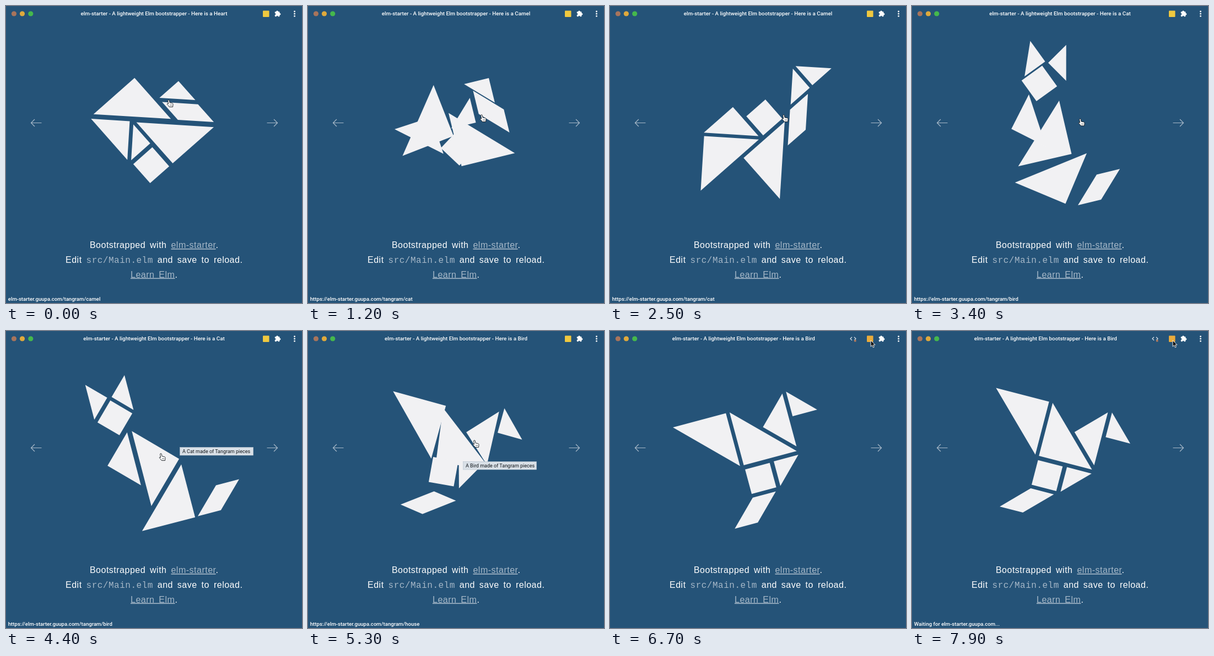
These frames come from a looping animation (537 px wide and 540 px high, 8 s). An HTML page with a canvas:

```html
<!DOCTYPE html>
<html lang="en">
<head>
<meta charset="utf-8">
<title>elm-starter</title>
<style>
html, body { margin: 0; width: 100%; height: 100%; overflow: hidden; background: #255378; }
canvas, svg { position: absolute; left: 0; top: 0; width: 537px; height: 540px; }
.ui { font-family: Roboto, Inter, sans-serif; font-weight: 500; fill: #fff; }
.page { font: 16px "Liberation Sans", Arial, sans-serif; letter-spacing: .5px; word-spacing: 3px; fill: #fff; text-anchor: middle; }
.dim { fill: #a6b8c8; }
.link { fill: #a6b8c8; text-decoration: underline; }
.code { font-family: "Liberation Mono", "Courier New", monospace; }
.arrow { fill: none; stroke: #a9bac9; stroke-width: 1.2; }
</style>
</head>
<body>
<canvas id="stage" width="537" height="540"></canvas>
<svg viewBox="0 0 537 540">
  <circle cx="14.5" cy="14" r="4.6" fill="#a8745c"/>
  <circle cx="29.5" cy="14" r="4.6" fill="#dfa93c"/>
  <circle cx="44.8" cy="14" r="4.6" fill="#45b84c"/>
  <text id="title" class="ui" y="17.3" font-size="9.8" text-anchor="middle"></text>

  <g id="blocked">
    <path d="M439 11l-3 3 3 3M443 11l3 3-3 3" fill="none" stroke="#dfe6ec" stroke-width="1.2"/>
    <rect x="443" y="16" width="3.5" height="3.5" fill="#b07a5e"/>
  </g>
  <rect id="ext" x="466" y="8.5" width="11.5" height="11.5" rx="1"/>
  <g fill="#fff">
    <rect x="487.8" y="10.3" width="8.6" height="9" rx="1"/>
    <circle cx="492" cy="10.3" r="1.8"/>
    <circle cx="496.6" cy="14.7" r="1.8"/>
    <circle cx="523.5" cy="10" r="1.4"/>
    <circle cx="523.5" cy="14.2" r="1.4"/>
    <circle cx="523.5" cy="18.4" r="1.4"/>
  </g>
  <g fill="#255378">
    <circle cx="488" cy="14.7" r="1.4"/>
    <circle cx="492" cy="19.2" r="1.4"/>
  </g>

  <path class="arrow" d="M64.5 212.5h-19m6.5-6.5-6.5 6.5 6.5 6.5"/>
  <path class="arrow" d="M473.5 212.5h19m-6.5-6.5 6.5 6.5-6.5 6.5"/>

  <text class="page" x="268.7" y="440">Bootstrapped with <tspan class="link">elm-starter</tspan>.</text>
  <text class="page" x="268.7" y="467">Edit <tspan class="dim code">src/Main.elm</tspan> and save to reload.</text>
  <text class="page" x="268.7" y="493.5"><tspan class="link">Learn Elm</tspan>.</text>
  <text id="status" class="ui" x="3.8" y="536.3" font-size="9.6"></text>

  <g id="tip">
    <rect width="133" height="14.5" fill="#d9e0e7" stroke="#b4c1cd" stroke-width=".6"/>
    <text id="tipText" class="ui" x="4.5" y="10.5" font-size="9" style="fill:#10151a;font-weight:400"></text>
  </g>
  <g id="hand" stroke="#15191d" stroke-width=".9" stroke-linejoin="round" fill="#fff">
    <path d="M-1.3 1C-1.3-.8 1-.8 1.3 1L2 4.8 6.5 5.6Q8 6.1 8 7.6L7.5 12.5H1.3Q-.2 9.8-2.7 7.8-3 6-1.2 6.5L-.4 7.2Z"/>
    <path d="M3 8v2.5M5.2 8v2.5" fill="none" stroke-width=".7"/>
  </g>
  <path id="pointer" d="M0 0V11.3L2.6 8.9 4.4 13 6.3 12.1 4.5 8.2H8Z" fill="#111" stroke="#fff" stroke-width=".9"/>
</svg>
<script>
const LOOP = 8000, CX = 269, CY = 212, SCALE = 0.2512;
const CLICKS = [970, 2780, 4600], MORPH = 1000;
const LEAVE = 5750, BLOCK = 6300, RELOAD = 7500;
const NAMES = ['Heart', 'Camel', 'Cat', 'Bird', 'House'];

const $ = id => document.getElementById(id);
const ctx = $('stage').getContext('2d');
const clamp = v => Math.max(0, Math.min(1, v));
const mix = (a, b, p) => a + (b - a) * p;
const smooth = p => p * p * (3 - 2 * p);

const triangle = (half, base, top) => [[-half, base], [0, -top], [half, base]];
const BIG = triangle(280, 90, 190);
const MEDIUM = triangle(198, 66, 132);
const SMALL = triangle(130, 44, 86);
const SQUARE = [[-130, 0], [0, -130], [130, 0], [0, 130]];
const SLANT = [[-191, -61], [69, -61], [191, 61], [-69, 61]];

// Each figure places a piece by x, y and eighths of a turn.
const place = (shape, ...poses) => ({ shape, poses });
const pieces = [
  place(BIG, [-162, -124, 0], [-250, 256, 7], [-37, 124, 2], [-296, -167, 1]),
  place(BIG, [151, 96, 4], [100, 262, 6], [24, 428, 3], [0, -38, 5]),
  place(MEDIUM, [-271, 94, 1], [-190, 31, 0], [-228, 42, 6], [203, -135, 6]),
  place(SQUARE, [-3, 309, 0], [41, -40, 0], [-221, -280, 0], [-41, 220, 1]),
  place(SLANT, [238, -91, 0], [284, -39, 2], [357, 468, 7], [-138, 431, 3]),
  place(SMALL, [156, -225, 0], [269, -275, 2], [-324, -435, 2], [143, 186, 7]),
  place(SMALL, [-106, 152, 2], [373, -381, 4], [-120, -432, 6], [359, -216, 5])
];

// Cursor moves: start, end, then where the hot spot comes to rest.
const moves = [[600, 1000, 315, 198], [2900, 4300, 281, 223],
  [4450, 5000, 302, 199], [5550, 6200, 473, 17]];

const bezier = (a, b, s) => 3 * a * s * (1 - s) ** 2 + 3 * b * s * s * (1 - s) + s ** 3;

// cubic-bezier(.25, .1, .25, 1)
function ease(x) {
  let lo = 0, hi = 1;
  for (let i = 0; i < 24; i++) {
    const mid = (lo + hi) / 2;
    if (bezier(0.25, 0.25, mid) < x) lo = mid; else hi = mid;
  }
  return bezier(0.1, 1, lo);
}

function drawTangram(t, index) {
  const p = index ? ease(clamp((t - CLICKS[index - 1]) / MORPH)) : 1;
  const wobble = 15.3 * Math.sin(0.23 + t * 0.002515);
  ctx.fillStyle = '#255378';
  ctx.fillRect(0, 0, 537, 540);
  ctx.save();
  ctx.translate(CX, CY);
  ctx.rotate(wobble * Math.PI / 180);
  ctx.scale(SCALE, SCALE);
  ctx.fillStyle = '#f1f1f3';
  for (const { shape, poses } of pieces) {
    const from = poses[Math.max(0, index - 1)];
    const [x, y, turn] = poses[index].map((v, i) => mix(from[i], v, p));
    ctx.save();
    ctx.translate(x, y);
    ctx.rotate(turn * Math.PI / 4);
    ctx.beginPath();
    shape.forEach(point => ctx.lineTo(...point));
    ctx.fill();
    ctx.restore();
  }
  ctx.restore();
}

function cursorAt(t) {
  let x = 295, y = 171;
  for (const [start, end, toX, toY] of moves) {
    const p = smooth(clamp((t - start) / (end - start)));
    x = mix(x, toX, p);
    y = mix(y, toY, p);
  }
  return [x, y];
}

const show = (id, on) => $(id).setAttribute('visibility', on ? 'visible' : 'hidden');
const moveTo = (id, x, y) => $(id).setAttribute('transform', `translate(${x} ${y})`);
function setText(id, text) {
  if ($(id).textContent !== text) $(id).textContent = text;
}

function statusAt(t, index) {
  if (t >= RELOAD) return 'Waiting for elm-starter.guupa.com...';
  if (t >= LEAVE) return '';
  const scheme = index ? 'https://' : '';
  return `${scheme}elm-starter.guupa.com/tangram/${NAMES[index + 1].toLowerCase()}`;
}

function render(t) {
  const index = CLICKS.filter(c => t >= c).length;
  drawTangram(t, index);

  const blocked = t >= BLOCK;
  setText('title', `elm-starter - A lightweight Elm bootstrapper - Here is a ${NAMES[index]}`);
  $('title').setAttribute('x', blocked ? 242.3 : 268.5);
  $('ext').setAttribute('fill', blocked ? '#e9ab3c' : '#f0c83f');
  show('blocked', blocked);
  setText('status', statusAt(t, index));

  const catTip = t >= 3900 && t < CLICKS[2];
  const birdTip = t >= 5100 && t < LEAVE;
  show('tip', catTip || birdTip);
  setText('tipText', `A ${NAMES[index]} made of Tangram pieces`);
  moveTo('tip', birdTip ? 281.5 : 315.5, birdTip ? 237.5 : 211.5);

  const cursor = cursorAt(t);
  show('hand', t < LEAVE);
  show('pointer', t >= LEAVE);
  moveTo('hand', ...cursor);
  moveTo('pointer', ...cursor);
}

const start = performance.now();
function tick() {
  render((performance.now() - start) % LOOP);
  requestAnimationFrame(tick);
}
tick();
</script>
</body>
</html>
```
